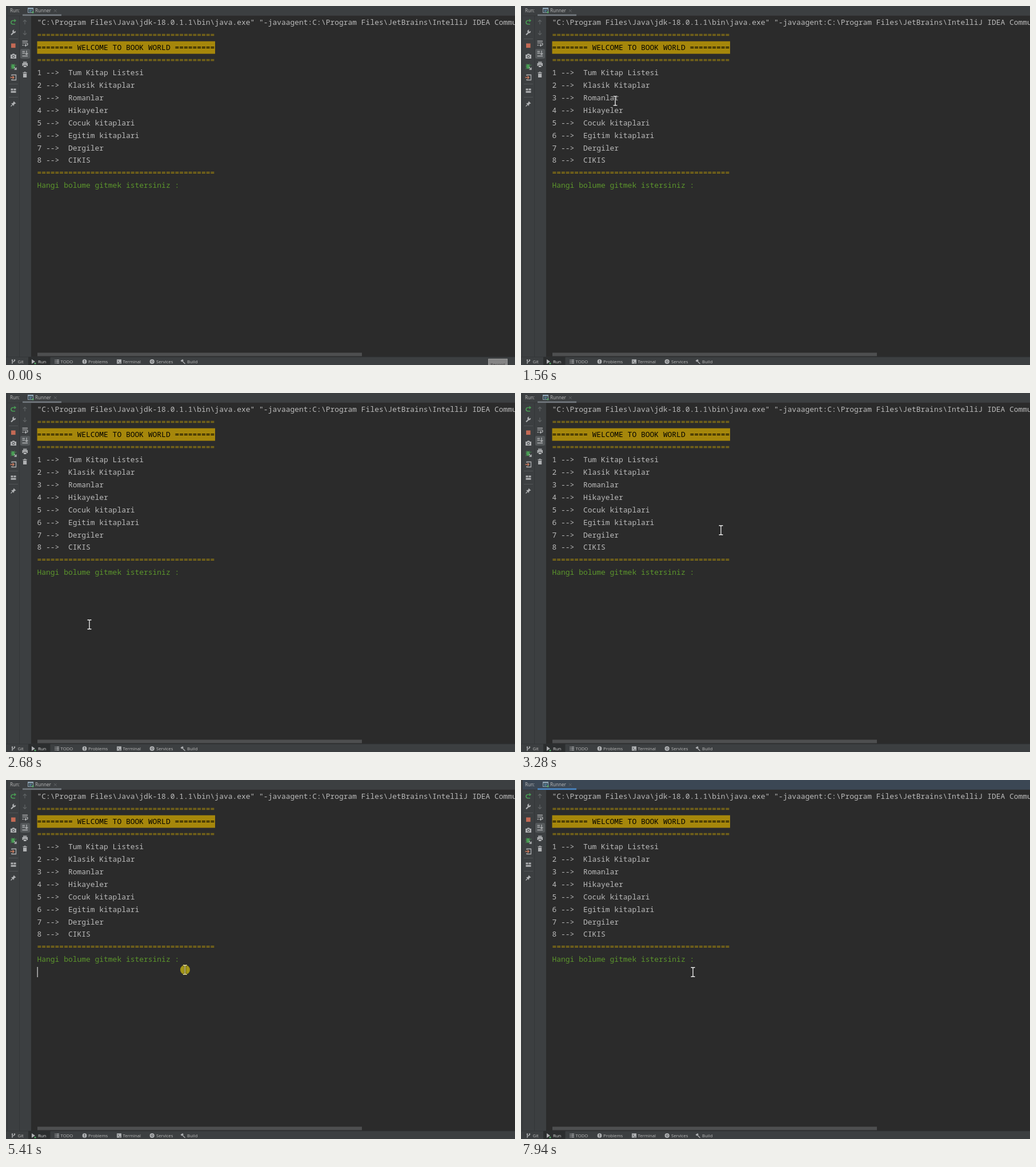
These frames come from a looping animation (891 by 628 pixels, 8 s). An HTML page:

```html
<!DOCTYPE html>
<html lang="tr">
<head>
<meta charset="utf-8">
<title>Console menu</title>
<style>
  html, body { margin: 0; width: 100%; height: 100%; overflow: hidden; background: #2b2b2b; }
  svg { display: block; width: 891px; height: 628px; }
  text { white-space: pre; }
  .console { font: 12.96px "Noto Sans Mono", "DejaVu Sans Mono", monospace; fill: #bbb; font-variant-ligatures: none; }
  .ui { font: 7.75px "Open Sans", "Noto Sans", sans-serif; fill: #bbb; }
  .line { fill: none; stroke: #afb1b3; stroke-width: 1.3; }
  .solid { fill: #afb1b3; }
  .rule { fill: none; stroke: #515456; stroke-width: 1; }
</style>
</head>
<body>
<svg viewBox="0 0 891 628">
  <rect width="891" height="628" fill="#2b2b2b"/>
  <rect width="44" height="628" fill="#3c3f41"/>
  <rect width="891" height="17" fill="#3c3f41"/>
  <rect id="header" x="3" width="888" height="17" fill="#3c3f41"/>
  <path d="M2.5 0V614M23.5 17V614" stroke="#333638" fill="none"/>
  <path d="M3 17.2H891" stroke="#323232" stroke-width=".6"/>

  <g class="ui">
    <text x="7" y="11" font-size="8.05" style="font-size:8.05px">Run:</text>
    <text x="51" y="11" style="font-size:8.1px">Runner</text>
  </g>
  <rect id="underline" x="29" y="14.6" width="68" height="2.6" fill="#747a80"/>
  <path d="M84 6l4.6 4.6M88.600 6l-4.600 4.600" stroke="#6b6e70" stroke-width=".8"/>
  <rect x="38.500" y="3.500" width="9" height="8" fill="none" stroke="#8fa5b5"/>
  <path d="M38 4.500h10" stroke="#8fa5b5" stroke-width="2"/>
  <path d="M40.500 7.500h5M40.500 9.500h4" stroke="#5c9fc0"/>
  <circle cx="47" cy="11" r="1.800" fill="#59a869"/>

  <!-- first tool column -->
  <path d="M16 25.500H12a3 3 0 0 0 0 6.200H16" fill="none" stroke="#499c54" stroke-width="1.600"/>
  <path d="M14.500 22.500l3.500 3-3.500 3z" fill="#499c54"/>
  <path d="M9 50.500l5-5" stroke="#afb1b3" stroke-width="2.200"/>
  <path d="M17 43.500a3 3 0 1 1-2.500-2l-1.200 2 1.800 1.500z" class="solid"/>
  <path d="M5 57.500H21M5 136.500H21M5 159.500H21" class="rule"/>
  <rect x="9" y="65.500" width="7.600" height="7.600" fill="#c46a55"/>
  <path d="M8 85h2.500l1-1.500h3l1 1.500H18v7H8z" class="solid"/>
  <circle cx="13" cy="88.300" r="2" fill="#afb1b3" stroke="#3c3f41"/>
  <path d="M8 103l2 1M8 106.500h2M8 110l2-1M16 104l2-1M10 101l1 2M15 101l-1 2" stroke="#499c54"/>
  <ellipse cx="12.500" cy="106" rx="3" ry="4" fill="#499c54"/>
  <path d="M14 107l3.500 3.500M18 107.500V111H14.500" class="line"/>
  <path d="M10 122V120.500H17.500V129.500H10V128" class="line"/>
  <path d="M7.500 125H14M11.500 122.500L14 125l-2.500 2.500" fill="none" stroke="#c97b5e" stroke-width="1.300"/>
  <path d="M8.500 144.500h4v3h-4zM13.500 144.500h4v3h-4zM8.500 148.700h9v3h-9z" class="solid"/>
  <path d="M8.500 175.500l3.500-3.500" class="line"/>
  <path d="M13.500 166.500l4 4-2 .500-1.500 1.500v2.500l-5-5h2.500l1.500-1.500z" class="solid"/>

  <!-- second tool column -->
  <path d="M33 32V24.500M30 27.500l3-3 3 3M33 43V50.500M30 47.500l3 3 3-3" fill="none" stroke="#5f6365" stroke-width="1.200"/>
  <path d="M28.500 61.500H38M28.500 64.700H36a2 2 0 0 1 0 4H33M35 66.700l-2 2 2 2M28.500 68.500h2.500" class="line"/>
  <rect x="25" y="75" width="17" height="17" rx="2.500" fill="#54585a"/>
  <path d="M28.500 79.500h4.500M28.500 82.500h4.500M28.500 87.500H38M36 78V85M33.700 82.700l2.300 2.300 2.300-2.300" class="line"/>
  <path d="M30 97.500h6.500v2H30zM28.500 100H38v5h-2v-2h-5.500v2h-2zM31 104h4.500v3H31z" class="solid"/>
  <path d="M29.500 116h2l.600-1h2l.600 1h2v1.300h-7.200zM30 118.200h6.200V125H30z" class="solid"/>

  <!-- console text -->
  <rect x="54.500" y="61.700" width="311.500" height="21.900" fill="#a6870b"/>
  <g id="console" class="console"></g>
  <rect x="55" y="606.500" width="568" height="6" fill="#4e4f50"/>

  <!-- bottom bar -->
  <rect y="614" width="891" height="14" fill="#3c3f41"/>
  <path d="M0 614H891" stroke="#323435" stroke-width=".8"/>
  <rect x="39" y="614" width="38.500" height="14" fill="#2c2e2f"/>
  <g id="tabs" class="ui"></g>
  <path d="M11 619v7M15 619v1.500c0 2-4 1-4 3.500" class="line" stroke-width="1"/>
  <circle cx="11" cy="619.500" r="1.200" class="solid"/><circle cx="15" cy="619.500" r="1.200" class="solid"/>
  <path d="M45 618l6 4-6 4z" class="solid"/><circle cx="51" cy="625.200" r="1.500" fill="#59a869"/>
  <path d="M85.500 619.300h1.500M88 619.300h5M85.500 622h1.500M88 622h5M85.500 624.700h1.500M88 624.700h5" class="line"/>
  <circle cx="137.500" cy="622" r="3.900" class="solid"/>
  <path d="M137.500 619.500v3M137.500 623.500v1.200" stroke="#3c3f41" stroke-width="1.200"/>
  <rect x="194" y="618.200" width="8" height="7.500" class="solid"/>
  <path d="M195.500 620l1.800 1.700-1.800 1.700M198 624.200h2.800" fill="none" stroke="#3c3f41" stroke-width=".9"/>
  <circle cx="255.700" cy="622" r="3" fill="none" stroke="#afb1b3" stroke-width="2.200"/>
  <path d="M254.700 620l3 2-3 2z" class="solid"/>
  <path d="M305.500 620.500l3.500-2.500 2 2-3.500 2.500z" class="solid"/>
  <path d="M308.500 621l5 5" class="line" stroke-width="1.800"/>

  <g id="record">
    <rect x="844" y="617" width="34" height="12" fill="#858585"/>
    <path d="M844.500 628V617.500H877.500V628" fill="none" stroke="#9a9a9a"/>
    <text x="848" y="629.500" class="ui" style="fill:#404040">Record</text>
  </g>

  <rect id="caret" x="54.500" y="327" width="1.300" height="18" fill="#d0d0d0"/>
  <circle id="halo" cx="313.500" cy="332" r="8.500" fill="#a39617"/>
  <g id="pointer">
    <g id="beam" fill="none">
      <path d="M-4-8H-1L0-7.200 1-8H4M-4 8H-1L0 7.200 1 8H4M0-7.500V7.500" stroke="#1b1b1b" stroke-width="2.600"/>
      <path id="beamCore" d="M-3.500-8H-1L0-7.200 1-8H3.500M-3.500 8H-1L0 7.200 1 8H3.500M0-7.500V7.500" stroke="#fff" stroke-width="1.300"/>
    </g>
    <path id="arrow" d="M0 0V12.500L2.900 9.800 4.900 14.300 6.800 13.500 4.900 9.100H9z" fill="#fff" stroke="#111" stroke-width=".7"/>
  </g>
</svg>
<script>
const LOOP = 8000;
const $ = id => document.getElementById(id);

function addText(parent, content, x, y, fill) {
  const node = document.createElementNS("http://www.w3.org/2000/svg", "text");
  node.setAttribute("x", x);
  node.setAttribute("y", y);
  if (fill) node.style.fill = fill;
  node.textContent = content;
  parent.append(node);
}

const YELLOW = "#a68a0d", GREEN = "#5c962c";
const rule = "=".repeat(40);
const menu = ["Tum Kitap Listesi", "Klasik Kitaplar", "Romanlar", "Hikayeler",
  "Cocuk kitaplari", "Egitim kitaplari", "Dergiler", "CIKIS"];
const rows = [
  [String.raw`"C:\Program Files\Java\jdk-18.0.1.1\bin\java.exe" "-javaagent:C:\Program Files\JetBrains\IntelliJ IDEA Community`],
  [rule, YELLOW],
  ["======== WELCOME TO BOOK WORLD =========", "#000"],
  [rule, YELLOW],
  ...menu.map((label, i) => [`${i + 1} -->  ${label}`]),
  [rule, YELLOW],
  ["Hangi bolume gitmek istersiniz :", GREEN]
];
rows.forEach(([line, fill], i) => addText($("console"), line, 54.5, 33.3 + i * 21.92, fill));

const tabs = [["Git", 20.5], ["Run", 56], ["TODO", 95.5], ["Problems", 144],
  ["Terminal", 204.5], ["Services", 263], ["Build", 317]];
tabs.forEach(([label, x]) => addText($("tabs"), label, x, 625, label === "Run" && "#ddd"));

// Pointer path: time, x, y
const path = [
  [0, 840, 650], [440, 828, 640], [490, 832, 624], [590, 852, 620],
  [790, 852, 620], [950, 720, 520], [1200, 400, 310], [1400, 215, 200], [1560, 165, 166], [1610, 165, 163],
  [1640, 165, 163], [1850, 250, 90], [2050, 413, 56], [2250, 250, 52], [2430, 100, 90],
  [2460, 100, 90], [2580, 6, 270], [2680, 146, 405], [2730, 146, 404], [2980, 186, 58],
  [3130, 424, 110], [3280, 350, 240],
  [3640, 350, 240], [3950, 225, 175], [4190, 135, 138], [4240, 133, 137],
  [4390, 133, 137], [4700, 126, 245], [4950, 175, 353], [5210, 308, 332], [5260, 313.3, 332],
  [5780, 313.3, 332], [5930, 301, 336], [LOOP, 301, 336]
];

function pointerAt(t) {
  const next = path.findIndex(key => key[0] > t);
  const [t0, x0, y0] = path[next - 1], [t1, x1, y1] = path[next];
  const k = (t - t0) / (t1 - t0);
  return [x0 + (x1 - x0) * k, y0 + (y1 - y0) * k];
}

const show = (id, on) => $(id).setAttribute("visibility", on ? "visible" : "hidden");
const within = (t, from, to) => t >= from && t < to;

function draw(t) {
  const [x, y] = pointerAt(t);
  const overPanel = x < 44 || y > 606;
  $("pointer").setAttribute("transform", `translate(${x} ${y})`);
  show("arrow", overPanel);
  show("beam", !overPanel);

  const clicked = within(t, 5410, 5460);
  show("halo", clicked);
  $("beamCore").setAttribute("stroke", clicked ? "#fff59a" : "#fff");
  show("caret", within(t, 5410, 5930) || within(t, 6430, 6930) || within(t, 7440, 7940));

  const focused = t >= 5460;
  $("header").setAttribute("fill", focused ? "#3b4754" : "#3c3f41");
  $("underline").setAttribute("fill", focused ? "#4a88c7" : "#747a80");

  show("record", t < 100);
  $("record").setAttribute("opacity", t < 50 ? 1 : 0.45);
}

const start = performance.now();
function tick() {
  draw((performance.now() - start) % LOOP);
  requestAnimationFrame(tick);
}
tick();
</script>
</body>
</html>
```
